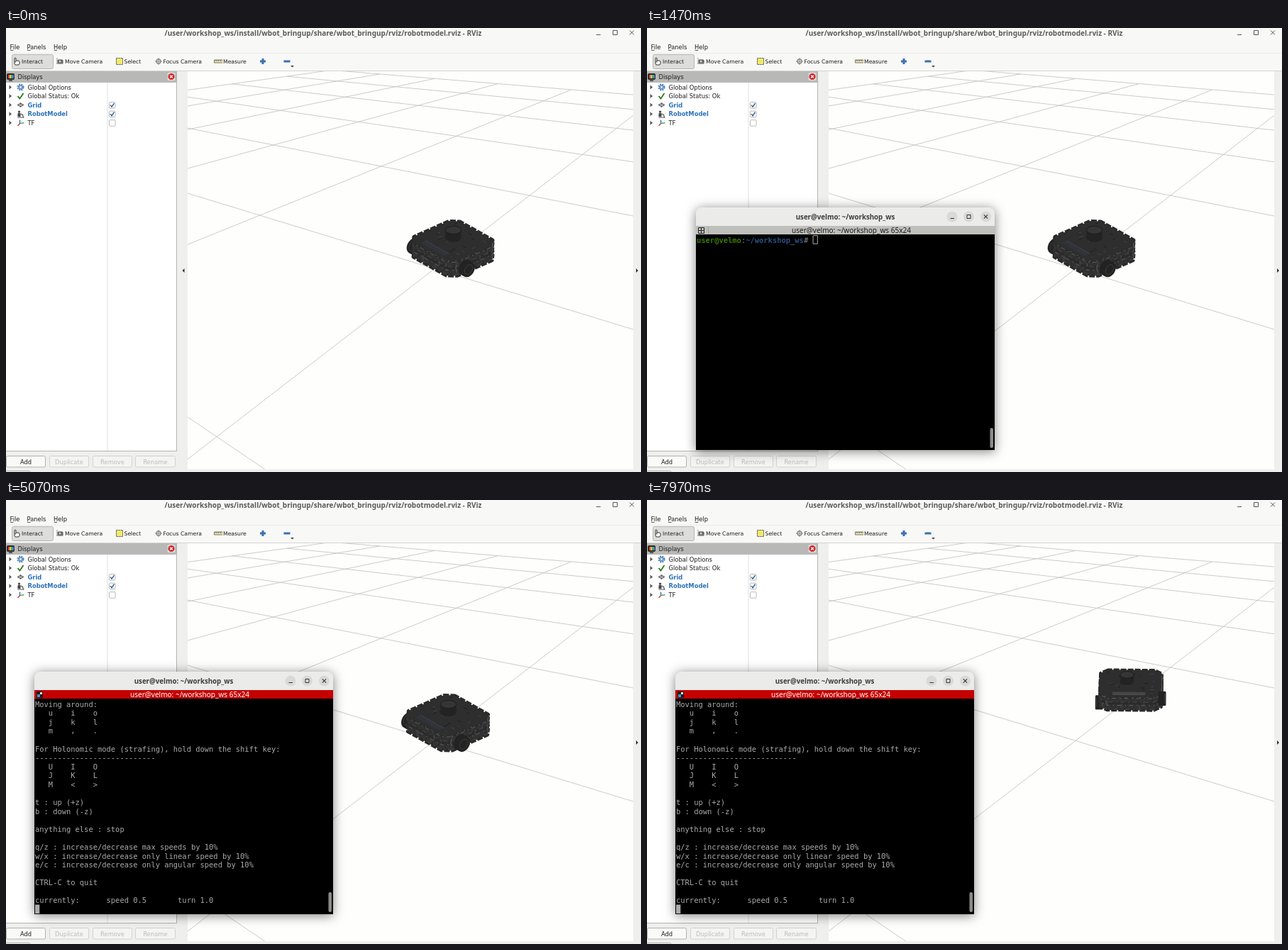
An HTML page with a canvas for the animation above (8 s loop, 895 px wide and 626 px high).

```html
<!DOCTYPE html>
<html lang="en">
<head>
<meta charset="utf-8">
<title>Robot model and keyboard teleop</title>
<style>
html, body { margin: 0; width: 100%; height: 100%; overflow: hidden; background: #efefee; }
canvas { display: block; width: 895px; height: 626px; }
</style>
</head>
<body>
<canvas id="stage" width="895" height="626"></canvas>
<script>
const ctx = document.getElementById('stage').getContext('2d');
const LOOP = 8000, TAU = Math.PI * 2;
const UI = '"DejaVu Sans", sans-serif';
const HEAD = '"Noto Sans", sans-serif';
const MONO = '"DejaVu Sans Mono", monospace';
const USER = 'user', HOST = 'velmo';

// ---------- helpers ----------
function rect(x, y, w, h, fill) {
  ctx.fillStyle = fill;
  ctx.fillRect(x, y, w, h);
}
function box(x, y, w, h, r, fill, stroke) {
  ctx.beginPath();
  ctx.roundRect(x, y, w, h, r);
  if (fill) { ctx.fillStyle = fill; ctx.fill(); }
  if (stroke) { ctx.strokeStyle = stroke; ctx.lineWidth = 1; ctx.stroke(); }
}
function path(points, close) {
  ctx.beginPath();
  points.forEach(p => ctx.lineTo(p[0], p[1]));
  if (close) ctx.closePath();
}
function poly(points, fill) {
  path(points, true);
  ctx.fillStyle = fill;
  ctx.fill();
}
function line(points, color, width = 1) {
  path(points);
  ctx.strokeStyle = color;
  ctx.lineWidth = width;
  ctx.stroke();
}
function dot(x, y, r, fill) {
  ctx.beginPath();
  ctx.arc(x, y, r, 0, TAU);
  ctx.fillStyle = fill;
  ctx.fill();
}
function label(str, x, y, size, color, font = UI, weight = 'normal', align = 'left') {
  ctx.font = `${weight} ${size}px ${font}`;
  ctx.textAlign = align;
  ctx.fillStyle = color;
  ctx.fillText(str, x, y + size * 0.36);
}
function cross(x, y, r, color, width) {
  line([[x - r, y - r], [x + r, y + r]], color, width);
  line([[x - r, y + r], [x + r, y - r]], color, width);
}
// Rows are [time, ...values], joined by straight lines.
function along(keys, t) {
  if (t <= keys[0][0]) return keys[0].slice(1);
  for (let i = 1; i < keys.length; i++) {
    const a = keys[i - 1], b = keys[i];
    if (t < b[0]) {
      const u = (t - a[0]) / (b[0] - a[0]);
      return a.slice(1).map((v, n) => v + (b[n + 1] - v) * u);
    }
  }
  return keys[keys.length - 1].slice(1);
}
function seeded(seed) {
  return () => (seed = (seed * 16807) % 2147483647) / 2147483647;
}

// ---------- main window ----------
function icon(kind, x, y) {
  const dark = '#333';
  if (kind === 'hand') {
    box(x - 3, y - 1, 7, 6, 2, '#fff', dark);
    box(x - 3, y - 5, 2, 6, 1, '#fff', dark);
  } else if (kind === 'camera') {
    box(x - 3, y - 2, 7, 5, 1, '#777', '#444');
    dot(x, y, 1.3, '#ddd');
    line([[x - 4, y - 5], [x - 4, y + 4]], '#999');
    line([[x - 5, y + 3], [x + 5, y + 3]], '#999');
  } else if (kind === 'select') {
    rect(x - 5, y - 4, 10, 8, '#f3e96b');
    ctx.setLineDash([2, 1]);
    box(x - 4.5, y - 4.5, 9, 9, 0, null, '#444');
    ctx.setLineDash([]);
  } else if (kind === 'focus') {
    ctx.beginPath();
    ctx.arc(x, y, 3, 0, TAU);
    ctx.strokeStyle = '#888';
    ctx.lineWidth = 1.4;
    ctx.stroke();
    line([[x - 5, y], [x + 5, y]], '#888');
    line([[x, y - 5], [x, y + 5]], '#888');
  } else if (kind === 'ruler') {
    box(x - 8.5, y - 2, 17, 4, 0, '#f0e4a0', '#777');
    for (let i = -6; i < 8; i += 3) line([[x + i, y - 2], [x + i, y]], '#555');
  } else if (kind === 'gear') {
    ctx.setLineDash([2, 1.2]);
    ctx.beginPath();
    ctx.arc(x, y, 4, 0, TAU);
    ctx.strokeStyle = '#4d7fb8';
    ctx.lineWidth = 2;
    ctx.stroke();
    ctx.setLineDash([]);
    dot(x, y, 3.4, '#6d98c8');
    dot(x, y, 1.4, '#e8eef6');
  } else if (kind === 'tick') {
    line([[x - 4, y], [x - 1, y + 3.5], [x + 4, y - 4]], '#2c7a1e', 1.8);
  } else if (kind === 'grid') {
    poly([[x - 5, y], [x, y - 3.5], [x + 5, y], [x, y + 3.5]], '#666');
    line([[x - 2.5, y - 1.8], [x + 2.5, y + 1.8]], '#ddd');
    line([[x - 2.5, y + 1.8], [x + 2.5, y - 1.8]], '#ddd');
  } else if (kind === 'robot') {
    dot(x - 2, y - 3, 1.6, '#444');
    rect(x - 4, y - 1, 4, 5, '#444');
    line([[x, y], [x + 3, y + 1], [x + 4, y + 5]], '#555', 1.3);
    line([[x - 4, y + 5], [x + 5, y + 5]], '#555');
  } else if (kind === 'axes') {
    line([[x - 1, y + 1], [x - 1, y - 4]], '#2a5ad0', 1.3);
    line([[x - 1, y + 1], [x + 5, y]], '#2fa32f', 1.3);
    line([[x - 1, y + 1], [x - 4, y + 4]], '#d22', 1.3);
  }
}

function drawChrome() {
  rect(0, 0, 895, 626, '#efefee');
  rect(0, 0, 895, 60, '#f8f8f6');
  line([[0, 35.5], [895, 35.5]], '#ececea');
  line([[0, 60.5], [895, 60.5]], '#d4d4d2');
  const title = `/${USER}/workshop_ws/install/wbot_bringup/share/wbot_bringup/rviz/robotmodel.rviz - RViz`;
  label(title, 447, 7, 10, '#5b5b58', HEAD, 'bold', 'center');
  line([[832, 9.5], [838, 9.5]], '#555');
  box(855.5, 3.5, 6, 6, 0, null, '#555');
  cross(882, 6.5, 3, '#555', 1);

  [['File', 5.5], ['Panels', 29.5], ['Help', 67]].forEach(([s, x]) => {
    label(s, x, 26.5, 8.35, '#1c1c1c');
    line([[x + 0.5, 31.5], [x + 5, 31.5]], '#333', 0.8);
  });

  box(8.5, 37.5, 58, 20, 2, '#dddddb', '#b4b4b2');
  [['hand', 15, 'Interact', 22], ['camera', 76, 'Move Camera', 83],
   ['select', 160, 'Select', 166.5], ['focus', 215, 'Focus Camera', 221.5],
   ['ruler', 302, 'Measure', 306]].forEach(([kind, ix, s, x]) => {
    icon(kind, ix, 47);
    if (kind === 'ruler') rect(305, 42, 8, 10, '#f8f8f6');
    label(s, x, 47.5, 7.7, '#1c1c1c');
  });
  rect(358, 45.5, 8, 3, '#3a70b5');
  rect(360.5, 43, 3, 8, '#3a70b5');
  rect(391.5, 45.5, 9, 3, '#3a70b5');
  poly([[401, 53], [406, 53], [403.5, 55.5]], '#444');
}

function drawPanel() {
  rect(0, 61, 240, 16, '#b8b8b7');
  box(1.5, 64.5, 10, 8, 1, '#222', '#333');
  ['#d94b3a', '#e5c84a', '#4fae57', '#4a7bd0'].forEach((c, i) => rect(3 + i * 2, 66, 2, 5, c));
  rect(4, 73.5, 5, 1.5, '#333');
  label('Displays', 16.5, 69.3, 8.35, '#1c1c1c');
  box(227.5, 63, 11, 11, 2, '#e9e9e8', '#c4c4c3');
  dot(233, 68.5, 4.6, '#cf2a2a');
  cross(233, 68.5, 1.8, '#fff', 1.3);

  rect(0, 77, 240, 519, '#fff');
  line([[143, 77], [143, 596]], '#dededd');
  line([[240.5, 61], [240.5, 596]], '#b4b4b2');
  line([[0, 596.5], [241, 596.5]], '#b4b4b2');
  [['gear', 'Global Options'], ['tick', 'Global Status: Ok'], ['grid', 'Grid', true],
   ['robot', 'RobotModel', true], ['axes', 'TF', false]].forEach(([kind, s, on], i) => {
    const y = 83.5 + i * 12.55;
    poly([[4.5, y - 3], [8, y], [4.5, y + 3]], '#555');
    icon(kind, 20.5, y);
    label(s, 30.5, y + 0.3, 8.35, on ? '#2a72b8' : '#1c1c1c', UI, on ? 'bold' : 'normal');
    if (on === undefined) return;
    box(145.5, y - 4, 8.5, 8.5, 1, '#fff', '#b8b8b6');
    if (on) line([[147, y], [149, y + 2.5], [152.5, y - 2.5]], '#2f5f9a', 1.5);
  });

  [['Add', 0, 56], ['Duplicate', 61, 117], ['Remove', 122, 178], ['Rename', 182, 239]].forEach(([s, a, b], i) => {
    box(a + 0.5, 603.5, b - a - 1, 15.5, 2, i ? '#f4f4f3' : '#fafaf9', i ? '#d2d2d0' : '#b2b2b0');
    label(s, (a + b) / 2, 611.7, 8.35, i ? '#bcbcba' : '#1c1c1c', UI, 'normal', 'center');
  });
  box(-2, 624.5, 36, 6, 2, '#f4f4f3', '#b0b0ae');
  poly([[251.5, 339], [248.5, 342], [251.5, 345]], '#333');
  poly([[888, 339], [891, 342], [888, 345]], '#333');
}

// ---------- 3D view ----------
const HORIZON = -26.5;
// Ground plane: two vanishing points around the grid's centre.
function ground(i, j) {
  const a = i * 0.393, b = j * 0.259, w = 1 + a + b;
  return [(604 + a * 1078 - b * 593) / w, (339.4 + (a + b) * HORIZON) / w];
}
function drawGrid() {
  rect(256, 61, 628, 561, '#fefefd');
  for (let n = -1; n <= 5; n++) {
    if (n >= 0) line([ground(-1.6, n), ground(5, n)], '#c6c6c5', 0.9);
    line([ground(n, -1.8), ground(n, 5)], '#c6c6c5', 0.9);
  }
}

const POSE = [
  [4730, 630, 324, 41.6], [5070, 623, 327.5, 41.6], [5550, 618, 330, 41.6],
  [5730, 615, 332.5, 41.6], [6100, 615, 332.5, 41.6], [6515, 624.5, 327.4, 41.6],
  [6830, 644, 317, 42], [6930, 653, 312, 43], [7330, 681, 287, 66],
  [7730, 682, 280, 87], [7970, 682, 279.5, 89]
];

function drawRobot(t) {
  const [cx, cy, deg] = along(POSE, t);
  const yaw = deg * Math.PI / 180, c = Math.cos(yaw), s = Math.sin(yaw);
  const scale = (cy - HORIZON) / 350, wide = 1 + 0.08 * (deg - 41.6) / 47.4;
  // x forward, y left, z up
  const at = (x, y, z) => {
    const side = y * wide;
    return [cx + scale * (x * c - side * s),
            cy + scale * (-0.5 * (x * s + side * c) - 0.87 * z)];
  };
  const L = 44, W = 46, K = 11, TOP = 27;
  const shape = [[L, W - K], [L, K - W], [L - K, -W], [K - L, -W],
                 [-L, K - W], [-L, W - K], [K - L, W], [L - K, W]];
  const ring = z => shape.map(p => at(p[0], p[1], z));
  const facing = i => {
    const p = shape[i], q = shape[(i + 1) % 8];
    return (p[0] + q[0]) * s + (p[1] + q[1]) * c < 0;
  };
  const disc = (x, y, z, r) => Array.from({ length: 20 }, (_, i) =>
    at(x + r * Math.cos(i * TAU / 20), y, z + r * Math.sin(i * TAU / 20)));
  const wheel = (x, side) => {
    ctx.strokeStyle = '#232323';
    ctx.lineWidth = 3;
    for (let y = 43; y <= 51; y += 2) {
      poly(disc(x, side * y, 9, 10), '#232323');
      ctx.stroke();
    }
    path(disc(x, side * 51, 9, 7.5), true);
    ctx.strokeStyle = '#444';
    ctx.lineWidth = 0.8;
    ctx.stroke();
  };

  ctx.save();
  ctx.lineJoin = 'round';
  wheel(-30, 1);
  const low = ring(3), top = ring(TOP);
  shape.forEach((_, i) => {
    const n = (i + 1) % 8;
    poly([low[i], low[n], top[n], top[i]], '#2e2e2e');
  });
  // Knobbly plate edges
  [3, 9, 16, 22, TOP].forEach((z, n) => {
    path(ring(z), true);
    ctx.setLineDash([8, 2]);
    ctx.lineDashOffset = n * 3;
    ctx.strokeStyle = n % 2 ? '#323232' : '#2a2a2a';
    ctx.lineWidth = 4.5 * scale;
    ctx.stroke();
  });
  poly(top, '#2e2e2e');

  const rand = seeded(77);
  [5, 12, 18, 25].forEach((z, n) => {
    ctx.setLineDash([6, 4, 2, 5]);
    ctx.lineDashOffset = n * 5;
    shape.forEach((p, i) => {
      const q = shape[(i + 1) % 8];
      if (facing(i)) line([at(p[0], p[1], z), at(q[0], q[1], z)], n % 2 ? '#606060' : '#4c4c4c', 1);
    });
  });
  ctx.setLineDash([]);
  shape.forEach((p, i) => {
    const q = shape[(i + 1) % 8];
    for (let n = 0; n < 4; n++) {
      const u = rand(), z = 4 + rand() * 14, x = p[0] + (q[0] - p[0]) * u, y = p[1] + (q[1] - p[1]) * u;
      if (facing(i)) line([at(x, y, z), at(x, y, z + 7)], '#505050', 0.8);
    }
  });
  for (let n = 0; n < 24; n++) {
    const x = (rand() - 0.5) * 68, y = (rand() - 0.5) * 72, d = 3 + rand() * 5;
    line([at(x, y, TOP), n % 2 ? at(x + d, y, TOP) : at(x, y + d, TOP)], n % 3 ? '#1c1c1c' : '#474747', 0.9);
  }
  poly([at(-37, 27, TOP), at(-28, 27, TOP), at(-28, -22, TOP), at(-37, -22, TOP)], deg > 65 ? '#484848' : '#30343a');
  line([at(-28, 27, TOP), at(-28, -22, TOP)], '#454a50', 0.8);

  // Laser scanner
  const [lx, base] = at(6, 6, TOP), lid = at(6, 6, 40)[1], r = 11 * scale;
  ctx.beginPath();
  ctx.ellipse(lx, base, r, r * 0.5, 0, 0, Math.PI);
  ctx.ellipse(lx, lid, r, r * 0.5, 0, Math.PI, TAU);
  ctx.closePath();
  ctx.fillStyle = '#232323';
  ctx.fill();
  ctx.beginPath();
  ctx.ellipse(lx, lid, r, r * 0.5, 0, 0, TAU);
  ctx.fillStyle = '#353535';
  ctx.fill();
  ctx.strokeStyle = '#1a1a1a';
  ctx.lineWidth = 0.8;
  ctx.stroke();
  wheel(-16, -1);
  ctx.restore();
}

// ---------- terminal ----------
const CELL = 6.29, ROW = 12.58, COLS = 65, OPEN = 970, FOCUS = 2000;
const DRAG = [
  [970, 640, 210], [1070, 460, 236], [1200, 183, 274], [1350, 98, 264],
  [1500, 62, 250], [1770, 45, 241], [1870, 45, 241], [2000, 40, 242]
];
const COMMAND = 'ros2 run teleop_twist_keyboard teleop_twist_keyboard --ros-args -p stamped:=true';
const HELP = `Moving around:
   u    i    o
   j    k    l
   m    ,    .

For Holonomic mode (strafing), hold down the shift key:
---------------------------
   U    I    O
   J    K    L
   M    <    >

t : up (+z)
b : down (-z)

anything else : stop

q/z : increase/decrease max speeds by 10%
w/x : increase/decrease only linear speed by 10%
e/c : increase/decrease only angular speed by 10%

CTRL-C to quit

currently:      speed 0.5       turn 1.0`.split('\n');

function typed(t) {
  if (t < 2630) return '';
  if (t < 2665) return 'r';
  if (t < 2700) return 'ros';
  return t < 2900 ? 'ros2 ' : COMMAND;
}
const cursorOn = t => !(t >= 3930 && t < 4570) && !(t >= 5210 && t < 5870);

function drawTerminal(t) {
  if (t < OPEN) return;
  const [x, y] = along(DRAG, t).map(Math.round), w = 421, h = 342;
  const focus = t >= FOCUS;
  ctx.save();
  ctx.shadowColor = 'rgba(0,0,0,0.5)';
  ctx.shadowBlur = 16;
  ctx.shadowOffsetY = 2;
  box(x, y, w, h, [8, 8, 0, 0], '#ebebea');
  ctx.restore();
  const where = `${USER}@${HOST}: ~/workshop_ws`;
  label(where, x + 210.5, y + 13.3, 9.7, '#3c3c3c', HEAD, 'bold', 'center');
  [361, 384.5, 408.5].forEach(dx => dot(x + dx, y + 13, 7.5, '#d9d9d8'));
  line([[x + 358.5, y + 15.5], [x + 364, y + 15.5]], '#333');
  box(x + 382, y + 10.5, 5, 5, 0, null, '#333');
  cross(x + 408.5, y + 13, 2.6, '#333', 1.1);

  rect(x, y + 26, w, 12, focus ? '#c40000' : '#bfbfbc');
  if (focus) {
    rect(x + 3, y + 28, 9, 9, '#1c1c1c');
    rect(x + 4, y + 32, 4, 4, '#4f8fd0');
    rect(x + 8, y + 29, 3, 3, '#e8e8e8');
  } else {
    box(x + 3.5, y + 28.5, 8, 8, 0, null, '#222');
    line([[x + 7.5, y + 28], [x + 7.5, y + 37]], '#222');
    line([[x + 3, y + 32.5], [x + 12, y + 32.5]], '#222');
    line([[x + 17.5, y + 27], [x + 17.5, y + 38]], '#a4a4a2');
  }
  label(where + ' 65x24', x + 219, y + 32.6, 10.03, focus ? '#fff' : '#1c1c1c', HEAD, 'normal', 'center');
  rect(x, y + 38, w, h - 38, '#000');
  box(x + 414.5, y + 311, 4.5, 28, 2, '#8c8c8b');

  const put = (s, col, row, color, weight) =>
    label(s, x + 1 + col * CELL, y + 45.9 + row * ROW, CELL / 0.602, color, MONO, weight);
  const cell = (col, row) => [x + 1 + col * CELL, y + 39.2 + row * ROW];
  let col = 0, row = 23;
  if (t < 3570) {
    const id = `${USER}@${HOST}`, dir = '~/workshop_ws', text = typed(t);
    ctx.globalAlpha = focus ? 1 : 0.8;
    put(id, 0, 0, '#4e9a06', 'bold');
    put(':', id.length, 0, '#aaa');
    put(dir, id.length + 1, 0, '#3465a4', 'bold');
    const start = id.length + dir.length + 3;
    put('#', start - 2, 0, '#aaa');
    put(text.slice(0, COLS - start), start, 0, '#aaa');
    put(text.slice(COLS - start), 0, 1, '#aaa');
    ctx.globalAlpha = 1;
    const end = start + text.length;
    row = t >= 3370 ? 2 : Math.floor(end / COLS);
    col = t >= 3370 ? 0 : end % COLS;
  } else {
    HELP.forEach((s, r) => put(s, 0, r, '#aaa'));
  }
  const [px, py] = cell(col, row);
  if (!focus) box(px + 0.5, py + 0.5, CELL, ROW - 1, 0, null, '#aaa');
  else if (cursorOn(t)) rect(px, py, CELL, ROW, '#aaa');
}

// ---------- loop ----------
function draw(t) {
  drawChrome();
  drawPanel();
  ctx.save();
  ctx.beginPath();
  ctx.rect(256, 61, 628, 561);
  ctx.clip();
  drawGrid();
  drawRobot(t);
  ctx.restore();
  drawTerminal(t);
}
const begin = performance.now();
function tick() {
  draw((performance.now() - begin) % LOOP);
  requestAnimationFrame(tick);
}
tick();
</script>
</body>
</html>
```
